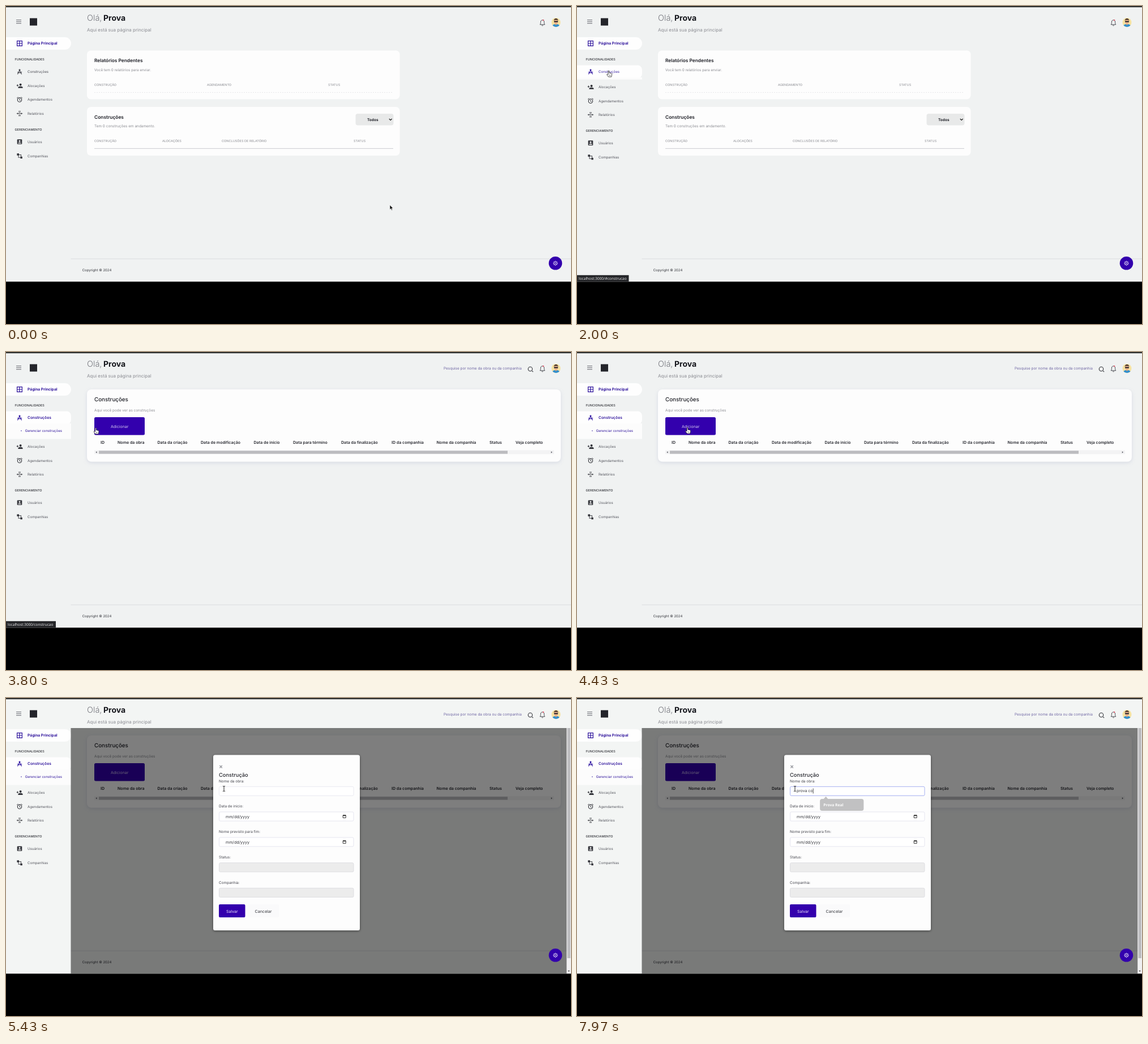
Write an HTML page that moves like this. It is 998 px wide and 561 px high and loops after 8 s.

```html
<!DOCTYPE html>
<html lang="pt">
<head>
<meta charset="utf-8">
<title>Painel</title>
<style>
html, body { margin: 0; width: 100%; height: 100%; overflow: hidden; background: #000; }
svg { display: block; width: 100%; height: 100%; }
text { font-family: Inter, "Open Sans", sans-serif; text-rendering: geometricPrecision; white-space: pre; }
.sys { font-family: "Noto Sans", "DejaVu Sans", sans-serif; }
</style>
</head>
<body>
<svg id="stage" viewBox="0 0 998 561"></svg>
<script>
const LOOP = 8000;
const INK = '#33343a', MUTED = '#8b8c92', PURPLE = '#3300ad', LABEL = '#2f149c';

const stage = document.getElementById('stage');
const $ = id => document.getElementById(id);

// Text placed by the vertical centre of its capitals.
const text = (x, mid, size, str, fill = INK, weight = 400, extra = '') =>
  `<text x="${x}" y="${(mid + size * .36).toFixed(2)}" font-size="${size}" fill="${fill}" font-weight="${weight}" ${extra}>${str}</text>`;
const rect = (x, y, w, h, fill, r = 0, extra = '') =>
  `<rect x="${x}" y="${y}" width="${w}" height="${h}" rx="${r}" fill="${fill}" ${extra}/>`;
const line = (d, stroke = INK, w = 1, extra = '') =>
  `<path d="${d}" fill="none" stroke="${stroke}" stroke-width="${w}" ${extra}/>`;
const fill = (d, color = INK) => `<path d="${d}" fill="${color}"/>`;
const dot = (x, y, r, color) => `<circle cx="${x}" cy="${y}" r="${r}" fill="${color}"/>`;
const group = (id, body, extra = '') => `<g id="${id}" ${extra}>${body}</g>`;
const at = (x, y, body) => `<g transform="translate(${x} ${y})">${body}</g>`;
const pill = (y, h, r) => fill(`M0 ${y}H${115 - r}a${r} ${r} 0 0 1 ${r} ${r}v${h - 2 * r}a${r} ${r} 0 0 1 ${-r} ${r}H0z`, '#fefefe');

// Icons are drawn around their own centre.
const icon = {
  grid: line('M-4.4 -4.4h8.8v8.8h-8.8zM0 -4.4v8.8M-4.4 0h8.8', LABEL, 1.2),
  compass: line('M-3.6 4.4L0 -2.5L3.6 4.4M-3.8 .4Q0 3 4 .2', 'currentColor', 1.2) + dot(0, -3.2, 1.5, 'currentColor'),
  addUser: dot(1.6, -1.9, 2, INK) + fill('M-2.6 4v-1.2C-2.6 .3 5.6 .3 5.6 2.8V4z') + line('M-5.4 -.6h3.6M-3.6 -2.4v3.6'),
  alarm: `<circle r="3.7" cy=".4" fill="none" stroke="${INK}" stroke-width="1.1"/>` + line('M0 -1.8V.7L1.7 1.7M-4.8 -2.7L-2.6 -4.6M4.8 -2.7L2.6 -4.6'),
  report: line('M-2 -3.8h4M-1.4 -1.2h2.8M-1.4 1.2h2.8M-2 3.8h4') + line('M-5.2 0h3M5.2 0h-3') + fill('M-3.4 -1.7L-1.6 0L-3.4 1.7zM3.4 -1.7L1.6 0L3.4 1.7z'),
  users: rect(-4.3, -4.3, 8.6, 8.6, INK, 1) + dot(0, -1.3, 1.5, '#f4f5f6') + fill('M-3 3.1C-2.6 .6 2.6 .6 3 3.1z', '#f4f5f6'),
  company: rect(-4.6, -4.4, 3.6, 3.6, INK) + rect(-2, -2, 4.6, 4.6, 'none', 0, `stroke="${INK}" stroke-width=".9"`) + rect(1.4, 1.2, 3.4, 3.4, INK),
  calendar: line('M-2.5 -2.2h5v4.6h-5z', '#222', .9) + line('M-2.5 -1.6h5M-1.3 -3v1M1.3 -3v1', '#222', 1)
};

const menuItem = (pic, y, label) => at(24, y, icon[pic]) + text(38, y, 6.15, label, '#55565e');
const section = (y, label) => text(15.5, y, 5.5, label, INK, 500);

const sidebar =
  line('M18 24.7h9M18 27.7h9M18 30.7h9', '#55565e', .9) +
  rect(42, 21.5, 13, 13, '#24252b') +
  pill(55, 22, 11) + at(24, 66, icon.grid) + text(38, 66, 6.7, 'Página Principal', LABEL, 700) +
  section(94.5, 'FUNCIONALIDADES') +
  group('openMenu', pill(104.5, 23, 8) + rect(0, 126, 115, 1, '#fcfcfc', 0, 'id="subBg"')) +
  group('build', at(24, 116, icon.compass) +
    text(38, 115.8, 6.15, 'Construções', 'currentColor', 400, 'id="buildLabel"') +
    text(38, 116, 6.75, 'Construções', LABEL, 600, 'id="buildBold"')) +
  group('subItem', dot(27, 139, 1.1, '#8f83c9') + text(33.8, 138.6, 6.05, 'Gerenciar construções', LABEL)) +
  group('lower',
    menuItem('addUser', 140.7, 'Alocações') +
    menuItem('alarm', 165.2, 'Agendamentos') +
    menuItem('report', 189.7, 'Relatórios') +
    section(218.3, 'GERENCIAMENTO') +
    menuItem('users', 239.5, 'Usuários') +
    menuItem('company', 264.5, 'Companhias'));

const avatar = dot(0, 0, 8, '#f6e3a1') +
  fill('M-6 5.3C-5 1.8 5 1.8 6 5.3A8 8 0 0 1 -6 5.3z', '#2f8fd0') +
  rect(-1.3, 1, 2.6, 3.4, '#dfa076') +
  `<ellipse cy="-1.4" rx="3.5" ry="4.3" fill="#efb58d"/>` +
  fill('M-3.8 -2.6C-4.2 -8.4 4.2 -8.4 3.8 -2.6L2.6 -4.6H-2.6z', '#3d2b26') +
  rect(-3.6, -2.6, 7.2, 2, '#1f2128', .9);

const header =
  text(143, 21, 14.5, 'Olá,', '#77787f', 300) + text(172, 21, 14, 'Prova', '#15161c', 700) +
  text(143, 41.7, 8, 'Aqui está sua página principal', MUTED) +
  at(947.5, 29.5, line('M-4.3 3.3C-3 2 -3.2 .4 -3.1 -1.4C-3 -5.8 3 -5.8 3.1 -1.4C3.2 .4 3 2 4.3 3.3zM-1.3 4.6Q0 6 1.3 4.6', '#33343c', .9) + dot(1.6, -4.6, 1.2, '#e0566a')) +
  at(971.5, 29, avatar) +
  group('search', text(773, 29, 6.45, 'Pesquise por nome da obra ou da companhia', '#6e65a3') +
    line('M929.3 33.3L931 35', INK, 1.2) +
    `<circle cx="926" cy="30" r="3.7" fill="none" stroke="${INK}" stroke-width="1.1"/>`);

const th = (x, y, label) => text(x, y, 5.55, label, MUTED);
const home =
  rect(143, 78.5, 552.5, 86, '#fdfdfd', 7) +
  text(156, 96.3, 8.35, 'Relatórios Pendentes', '#1d1e25', 600) +
  text(156, 112.5, 6.3, 'Você tem 0 relatórios para enviar.', MUTED) +
  th(156, 139, 'CONSTRUÇÃO') + th(355, 139, 'AGENDAMENTO') + th(569, 139, 'STATUS') +
  line('M156 152.5H684', '#e2e3e6', .8, 'stroke-dasharray="2 2"') +
  rect(143, 178, 552.5, 86, '#fdfdfd', 7) +
  text(156, 195.5, 8.4, 'Construções', '#1d1e25', 600) +
  text(156, 211.7, 6.45, 'Tem 0 construções em andamento.', MUTED) +
  rect(617.5, 190, 67, 20.5, '#e8e9e9', 4) +
  text(638, 200.3, 6.5, 'Todos', '#1d1e25', 700) + line('M676.8 199l2.4 2.4l2.4 -2.4', '#222', 1.3) +
  th(156, 238, 'CONSTRUÇÃO') + th(276, 238, 'ALOCAÇÕES') + th(381, 238, 'CONCLUSÕES DE RELATÓRIO') + th(614, 238, 'STATUS') +
  line('M156 251.4H684', '#c6c7cc', .9);

const columns = [[167, 'ID'], [197, 'Nome da obra'], [267.5, 'Data da criação'], [344, 'Data de modificação'],
  [437.5, 'Data de inicio'], [507, 'Data para término'], [592, 'Data da finalização'], [681, 'ID da companhia'],
  [760.5, 'Nome da companhia'], [854, 'Status'], [900, 'Veja completo']];
const works =
  rect(143, 66, 837, 127.5, '#fdfdfd', 8, 'filter="url(#soft)"') +
  text(156, 83, 9.8, 'Construções', '#1d1e25', 500) +
  text(156, 102.6, 6.43, 'Aqui você pode ver as construções', MUTED) +
  rect(156, 115, 89, 31.5, PURPLE, 2.5) + text(185, 131, 7, 'Adicionar', '#d3c9f0') +
  columns.map(([x, label]) => text(x, 159.7, 7.05, label, '#25262d', 600)).join('') +
  rect(156, 173.3, 812, 7, '#f3f3f4') + rect(164, 174.2, 722, 5.4, '#bcbcbf') +
  fill('M158.4 176.8l2.2 -1.6v3.2zM965 176.8l-2.2 -1.6v3.2z', '#55565e');

const field = (y, fillColor, stroke, extra = '') =>
  rect(376.5, y, 237.5, 16, fillColor, 2, `stroke="${stroke}" stroke-width=".9" ${extra}`);
const dateField = y => field(y - 8, '#fff', '#e3e3ee') + text(388, y, 7.05, 'mm/dd/yyyy', INK) + at(597.7, y, icon.calendar);
const modal =
  rect(114.5, 53, 876, 433, '#000', 0, 'opacity=".5"') +
  rect(990.5, 53, 7.5, 433, '#f0f0f1') + rect(991.5, 53, 5.5, 406, '#bdbdc0') + fill('M992.3 480.8h3.6l-1.8 2.2z', '#444') +
  rect(366, 100.5, 259, 309.5, '#fdfdfd', 3.5, 'filter="url(#deep)"') +
  line('M377.4 119l4.4 4.6M381.8 119l-4.4 4.6', '#999aa0', 1.4) +
  text(376, 136, 9.3, 'Construção', '#25262d', 500) +
  [[146.5, 'Nome da obra:'], [191, 'Data de inicio:'], [236, 'Nome previsto para fim:'], [281, 'Status:'], [325.6, 'Companhia:']]
    .map(([y, label]) => text(376, y, 6.45, label, '#44454d')).join('') +
  field(156.3, '#fff', '#e8e8f0', 'id="nameBox"') + dateField(209) + dateField(254) +
  field(290.8, '#ececec', '#dcdce0') + field(335.4, '#ececec', '#dcdce0') +
  rect(376, 364, 46.5, 23, PURPLE, 2) + text(389, 376, 7, 'Salvar', '#ebe6fa') +
  rect(427, 364, 55, 23, '#fafafb', 2) + text(439.5, 376, 7.1, 'Cancelar', INK) +
  text(388, 164, 6.9, '', INK, 400, 'id="typed"') + rect(0, 159.5, .8, 9, '#222', 0, 'id="caret"') +
  group('hint', fill('M433.5 178l4.5 -5l4.5 5z', '#1b1b1d') + rect(427, 177.5, 81.5, 22, '#1b1b1d', 4) +
    text(433.5, 188.7, 7.1, 'Prova Real', '#fff', 600, 'class="sys"'));

const teeth = [...Array(8).keys()].map(i => `<path d="M0 -2.8V-4.1" transform="rotate(${i * 45})" stroke="#e4dcf8" stroke-width="1.2"/>`).join('');
const fab = dot(0, 0, 11.8, PURPLE) +
  '<circle r="2.8" fill="none" stroke="#e4dcf8" stroke-width=".9"/>' + teeth + dot(0, 0, 1, '#e4dcf8');

const cursors =
  group('arrow', '<path d="M0 0V8.2L1.9 6.5L3.2 9.4L4.5 8.8L3.3 6H5.8z" fill="#111" stroke="#fff" stroke-width=".6"/>') +
  group('hand', '<path d="M-.9 .8Q0 -.6 .9 .8V4L4.6 4.8Q5.9 5.2 5.6 6.8L4.8 11H-.4L-3.4 7Q-3.4 5.4 -.9 6.8z" fill="#fff" stroke="#222" stroke-width=".8"/>' +
    line('M1 7.2v2.2M2.8 7.2v2.2', '#222', .6)) +
  group('beam', line('M-2 -4.6Q0 -4.6 0 -3.6Q0 -4.6 2 -4.6M0 -3.6V3.6M-2 4.6Q0 4.6 0 3.6Q0 4.6 2 4.6', '#222', 1));

stage.innerHTML =
  `<defs>
    <filter id="soft" x="-5%" y="-20%" width="110%" height="140%"><feDropShadow dx="0" dy="2" stdDeviation="3" flood-color="#8a8fb8" flood-opacity=".25"/></filter>
    <filter id="deep" x="-10%" y="-10%" width="120%" height="120%"><feDropShadow dx="0" dy="1" stdDeviation="2" flood-opacity=".5"/></filter>
  </defs>` +
  rect(0, 0, 998, 561, '#000') + rect(0, 0, 998, 486.3, '#f0f2f2', 0, 'id="paper"') + rect(0, 0, 998, 2.2, '#2c2d2b') +
  sidebar + header + group('home', home) + group('works', works) +
  line('M114.5 446H998', '#d9dbde', .9) + text(134.7, 466.2, 6, 'Copyright © 2024', INK) +
  group('modal', modal) + group('fab', fab) +
  group('status', rect(0, 474.8, 91.5, 11.5, '#26272a', 0, 'id="statusBox"') + text(3, 480.3, 6.5, '', '#e4e4e6', 400, 'id="link" class="sys"')) +
  group('cursor', cursors);

const clamp = v => Math.max(0, Math.min(1, v));
const span = (t, from, len) => clamp((t - from) / len);
const smooth = p => p * p * (3 - 2 * p);
const show = (id, on) => $(id).style.display = on ? '' : 'none';
const set = (id, name, value) => $(id).setAttribute(name, value);

const PATH = [[150, 678, 351], [1800, 56, 114], [2350, 56, 114], [2700, 62, 134], [3250, 84, 135], [3400, 84, 135],
  [4050, 195, 133], [4700, 195, 133], [5350, 385, 160]];
function pointer(t) {
  let i = 0;
  while (i < PATH.length - 2 && t > PATH[i + 1][0]) i++;
  const [t0, x0, y0] = PATH[i], [t1, x1, y1] = PATH[i + 1];
  const p = smooth(span(t, t0, t1 - t0));
  return [x0 + (x1 - x0) * p, y0 + (y1 - y0) * p];
}

const KEYS = [6050, 6190, 6350, 6480, 6620, 7450, 7790, 7930];
const HOVER = 1730, OPEN = 1935, NAV = 3420, MODAL = 4470, FOCUS = 5650;

function draw(t) {
  const hovered = t >= HOVER, open = smooth(span(t, OPEN, 370)), active = t >= 2310, dialog = t >= MODAL;

  set('paper', 'fill', dialog ? '#f3f5f4' : '#f0f2f2');
  show('openMenu', hovered);
  set('subBg', 'height', 1.5 + 26 * open);
  $('build').style.color = hovered ? '#3b23a6' : '#494a52';
  show('buildLabel', !active);
  show('buildBold', active);
  show('subItem', open > .5);
  set('subItem', 'opacity', span(open, .5, .4));
  set('lower', 'transform', `translate(0 ${26.2 * open})`);

  show('home', t < NAV);
  show('works', t >= NAV);
  show('search', t >= NAV);

  show('status', hovered && t < 3950);
  const sub = t >= 2620;
  $('link').textContent = sub ? 'localhost:3000/construcao' : 'localhost:3000/#construcao';
  set('statusBox', 'width', sub ? 88 : 91.5);

  // The new page has no round button until it rises into place.
  show('modal', dialog);
  const rise = t < NAV ? 1 : span(t, 4500, 390);
  set('fab', 'transform', `translate(970.5 ${453.8 + 23.5 * (1 - rise)})`);
  set('fab', 'opacity', rise);

  const count = KEYS.filter(k => t >= k).length;
  set('nameBox', 'stroke', t >= FOCUS ? '#9ca9f0' : '#e8e8f0');
  $('typed').textContent = 'prova co'.slice(0, count);
  const lastKey = count ? KEYS[count - 1] : FOCUS;
  show('caret', t >= FOCUS && (t - lastKey) % 1000 < 500);
  if (dialog) set('caret', 'x', 388.3 + (count ? $('typed').getComputedTextLength() : 0));
  const fade = span(t, 7850, 162);
  show('hint', t >= 6120);
  set('hint', 'opacity', span(t, 6120, 120) * (1 - fade));
  set('hint', 'transform', `translate(467.7 188.5) scale(${1 - .07 * fade}) translate(-467.7 -188.5)`);

  const [x, y] = pointer(t);
  const beam = dialog && x > 376;
  const hand = !dialog && hovered && (x < 115 || x > 154);
  set('cursor', 'transform', `translate(${x.toFixed(2)} ${y.toFixed(2)})`);
  show('beam', beam);
  show('hand', hand);
  show('arrow', !beam && !hand);
}

let start;
function tick(now) {
  start ??= now;
  draw((now - start) % LOOP);
  requestAnimationFrame(tick);
}
draw(0);
requestAnimationFrame(tick);
</script>
</body>
</html>
```
